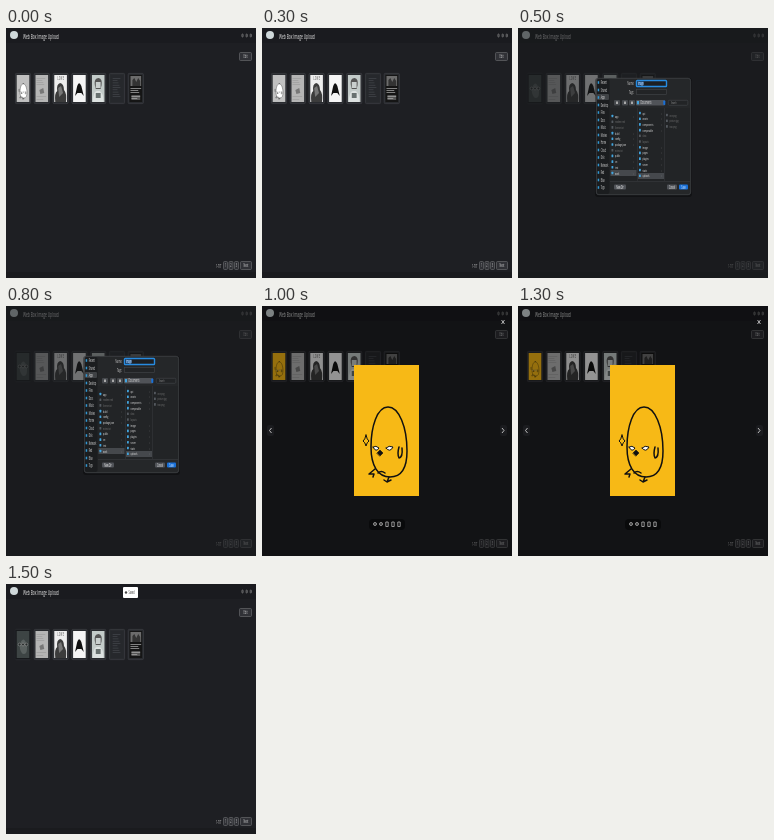
Animation, 250 px wide and 250 px high, one loop 2 s. Source, as an HTML page:

```html
<!DOCTYPE html>
<html lang="en">
<head>
<meta charset="utf-8">
<style>
  html, body { margin: 0; height: 100%; overflow: hidden; background: #1e1f23; }
  svg { display: block; width: 100vw; height: 100vh; font-family: "Open Sans", sans-serif; }
</style>
</head>
<body>
<svg id="stage" viewBox="0 0 250 250" preserveAspectRatio="none"></svg>
<script>
const SQUEEZE = 0.44; // the whole screen is narrowed, so all lettering is too
const rect = (x, y, w, h, fill, more = '') =>
  `<rect x="${x}" y="${y}" width="${w}" height="${h}" fill="${fill}" ${more}/>`;
const path = (d, fill, more = '') => `<path d="${d}" fill="${fill}" ${more}/>`;
const circle = (x, y, r, fill, more = '') => `<circle cx="${x}" cy="${y}" r="${r}" fill="${fill}" ${more}/>`;
const text = (x, y, size, label, fill = '#ddd', more = '') =>
  `<text transform="translate(${x} ${y}) scale(${SQUEEZE} 1)" font-size="${size}" fill="${fill}" ${more}>${label}</text>`;
const centred = 'text-anchor="middle"';
const group = (content, more) => `<g ${more}>${content}</g>`;
const button = (x, y, w, h, label) =>
  rect(x + .5, y + .5, w - 1, h - 1, '#303136', 'rx="1" stroke="#66676b" stroke-width=".7"') +
  text(x + w / 2, y + h / 2 + 1.8, 5, label, '#ddd', centred);

// Doodle of a chick on a 65 x 131 sheet
const chick = (paper, body, weight) => rect(0, 0, 65, 131, paper) + group(
  path('M34 42C23 42 17 62 17 82C17 101 24 112 36 112C48 112 53 102 53 86C53 62 45 42 34 42Z', body) +
  path('M19 82Q22 80 25 83Q22 88 19 82M32 83Q35 80 39 82Q36 88 32 83', '#fff', 'stroke-width="1"') +
  path('M23 88L26 85L29 88L26 91Z', '#111', 'stroke-width=".6"') +
  path('M24 108Q27 105 31 108M45 82Q43 89 45 93Q49 92 48 83M21 104L15 109L20 109L19 112M35 112L33 117L30 115M33 117L37 115', 'none') +
  path('M12 70Q13 75 15 76Q13 77 12 81Q11 77 9 76Q11 75 12 70Z', 'none', 'stroke-width="1"'),
  `stroke="#111" stroke-width="${weight}" stroke-linecap="round" stroke-linejoin="round"`);
const chickThumb = (paper, body) => group(chick(paper, body, 1.6), 'transform="scale(.2 .206)"');

const hoveredThumb = rect(-1.5, -1.5, 16, 30, '#17191c') + rect(0, 0, 13, 27, '#3d4444') +
  path('M6.8 8.6C4 9 3 15 3.4 18Q5 23 7.2 23Q10.6 23 10.6 18C10.6 13 9 9 6.8 8.6Z', '#59605f') +
  [3, 6.5, 10].map(x => circle(x, 13.5, 1.4, '#252a2a', 'stroke="#aaa" stroke-width=".5"')).join('');

const lines = (x, y, w, count, step, fill) =>
  Array.from({ length: count }, (_, i) => rect(x, y + i * step, w - (i * 3 % 4), .6, fill)).join('');

const otherThumbs = [
  rect(0, 0, 13, 27, '#b5b5b5') + lines(1, 3, 9, 4, 2, '#999') + path('M4 15L8 13L9 18L5 19Z', '#777') + lines(1, 21, 10, 2, 3, '#999'),
  rect(0, 0, 13, 27, '#eee') + text(6.5, 5, 4.5, 'L O V E', '#222', centred) +
    path('M1 27Q0 18 3 16Q2 9 6 8Q10 9 10 15Q13 18 12 27Z', '#3c3c3c') + path('M4 13L7 11L9 18L5 22Z', '#777'),
  rect(0, 0, 13, 27, '#f5f5f5') + path('M2 21L4 12Q6 5 8.5 11L11 21L8.5 18H4.5Z', '#101010'),
  rect(0, 0, 13, 27, '#c3cbc9') + path('M3 10Q2 3 7 3Q11 4 10 10L9 14H4Z', '#555') +
    rect(4, 7, 5, 6, '#c9cfce') + path('M1 27Q1 17 5 16H8Q12 18 12 27Z', '#dde2e1') + rect(4, 18, 5, 5, '#687170'),
  rect(0, 0, 13, 27, '#26282c') + lines(2, 3, 8, 9, 2.3, '#484b50'),
  rect(0, 0, 13, 27, '#151515') + path('M1 1H12V11H1Z', '#6c6c6c') + path('M3 11V5L5 3L7 7L9 3L11 6V11Z', '#333') +
    lines(1, 13, 11, 3, 2, '#ccc') + rect(2, 20, 9, 5, '#555') + lines(2, 21, 9, 2, 2.4, '#bbb'),
];

const page = first =>
  rect(0, 0, 250, 250, '#1e1f23') + rect(0, 0, 250, 15, '#1a1b1f') + rect(0, 244, 250, 6, '#1a1b1e') +
  circle(8, 7, 4, '#cfd8da') +
  text(17, 10.7, 7.5, 'Web Box Image Upload', '#eee') +
  [236.5, 240.7, 244.8].map(x => rect(x - .6, 6, 1.2, 3, 'none', 'rx=".6" stroke="#999" stroke-width=".6"')).join('') +
  button(233, 24, 13, 9, 'Edit') +
  [first, ...otherThumbs].map((art, i) => {
    const x = 9 + i * 18.8;
    return rect(x + .4, 45.4, 15.2, 30.2, '#292b2f', 'rx="1" stroke="#3e4045" stroke-width=".7"') +
      group(art, `transform="translate(${x + 1.7} 47) scale(.97 1)"`);
  }).join('') +
  text(210, 239.5, 5, '1-7/7') +
  button(217, 233, 5, 9, '1') + button(222.5, 233, 5, 9, '2') + button(228, 233, 5, 9, '3') +
  button(234, 233, 12, 9, 'Next');

const veil = (fill, opacity) => rect(0, 0, 250, 250, fill, `opacity="${opacity}"`);

const column = (x, y, names, faded) => names.split(' ').map((name, i) => {
  const dim = faded.includes(i), at = y + i * 5.7;
  return rect(x, at - 1.3, 1.8, 2.6, dim ? '#555a60' : '#42a5df', 'rx=".5"') +
    text(x + 3.5, at + 1.5, 4.2, name, dim ? '#777' : '#eee') +
    (dim ? '' : text(x + 22, at + 1.5, 4, '›', '#999'));
}).join('');

const sidebar = 'Recent Shared Apps Desktop Files Docs Music Movies Home Cloud Disk Network Red Blue Tags'.split(' ')
  .map((name, i) => rect(79.7, 53.2 + i * 7.5, 1.5, 2.6, '#3297d3') + text(82.7, 56 + i * 7.5, 4.4, name, '#e4e4e4')).join('');

const dialog =
  rect(77, 50, 97, 119, '#000', 'rx="3" opacity=".35"') +
  rect(78.3, 50.3, 94.4, 116.4, '#252729', 'rx="2.5" stroke="#4c4f52" stroke-width=".6"') +
  rect(79, 51, 12.5, 115, '#1b1d1f', 'rx="2"') + rect(79, 66, 12, 6, '#3f4245', 'rx="1"') + sidebar +
  text(116, 57, 5, 'Name:', '#ccc', 'text-anchor="end"') +
  rect(118.5, 52.5, 30, 6, '#1d1f22', 'stroke="#278be0" stroke-width="1.4" rx=".8"') +
  rect(119.6, 53.5, 6, 4, '#2562a3') + text(120, 57, 4.5, 'image', '#fff') +
  text(116, 66, 5, 'Tags:', '#ccc', 'text-anchor="end"') +
  rect(118.5, 61.5, 30, 5, '#222426', 'stroke="#44474a" stroke-width=".6"') +
  [96, 104, 111].map(x => rect(x, 72, 6, 5.5, '#45484c', 'rx="1"') + rect(x + 2, 73.5, 2, 2.5, '#aaa')).join('') +
  rect(118, 72, 29, 5.5, '#505358', 'rx="1"') + rect(119, 73, 2, 3.3, '#42a5df') +
  text(122.5, 76.4, 4.7, 'Documents', '#eee') + rect(145.3, 72.4, 2, 4.7, '#1970d8', 'rx=".8"') +
  rect(150.3, 72.3, 19.5, 5, '#222426', 'rx="1" stroke="#44474a" stroke-width=".6"') + text(153, 76, 4, 'Search', '#999') +
  rect(92, 80, 80, 73, '#222426') + rect(119.2, 80, .5, 73, '#383b3e') + rect(146.5, 80, .5, 73, '#383b3e') +
  rect(92.5, 142, 26, 6, '#45484c') + rect(120, 145, 26, 6, '#45484c') +
  column(93.5, 88, 'app readme.md license.txt build config package.json notes.txt public src test work', [1, 2, 6]) +
  column(121, 85, 'api assets components composable data layouts image pages plugins server static uploads', [4, 5]) +
  column(148, 87, 'one.png picture.jpg two.png', [0, 1, 2]) +
  rect(92, 153, 80, .5, '#3a3d40') +
  rect(96, 156.5, 12, 5, '#505358', 'rx="1"') + text(102, 160.7, 4.5, 'New Dir', '#fff', centred) +
  rect(149, 156.5, 10, 5, '#505358', 'rx="1"') + text(154, 160.7, 4.5, 'Cancel', '#fff', centred) +
  rect(161, 156.5, 9, 5, '#1970d8', 'rx="1"') + text(165.5, 160.7, 4.5, 'Save', '#fff', centred);

const viewer =
  group(chick('#f7b916', '#f7b916', 1.5), 'transform="translate(92 59)"') +
  path('M239.5 14L242.5 18M242.5 14L239.5 18', 'none', 'stroke="#ddd" stroke-width=".8"') +
  rect(5, 119, 7, 11, '#1b1c1f', 'rx="2"') + rect(238, 119, 7, 11, '#1b1c1f', 'rx="2"') +
  path('M9.5 122L7.5 124.5L9.5 127M240 122L242 124.5L240 127', 'none', 'stroke="#ccc" stroke-width=".9"') +
  rect(107, 213, 36, 11, '#090a0b', 'rx="4"') +
  [113, 119, 125, 131, 137].map((x, i) => i < 2
    ? circle(x, 218, 1.5, 'none', 'stroke="#ccc" stroke-width=".7"') + rect(x - .7, 217.7, 1.4, .6, '#ccc')
    : path(`M${x - 1.2} 216V220.5H${x + 1.2}V216Z`, 'none', 'stroke="#ccc" stroke-width=".7"')).join('');

const toast = rect(117, 3, 15, 11, '#fff', 'rx="1"') + circle(120, 8.5, 1.2, '#444') + text(122.5, 10.3, 5, 'Saved', '#333');

const scenes = [
  page(chickThumb('#c0c0c0', '#fff')),
  page(hoveredThumb) + veil('#18191b', .6) + dialog,
  group(page(chickThumb('#f7b916', '#f7b916')), 'style="filter:blur(.4px)"') + veil('#000', .4) + viewer,
  page(hoveredThumb) + toast,
];

const stage = document.getElementById('stage');
stage.innerHTML = scenes.map(scene => group(scene, 'visibility="hidden"')).join('');
const layers = [...stage.children];
const start = performance.now();

function draw() {
  const current = Math.floor((performance.now() - start) % 2000 / 500);
  layers.forEach((layer, i) => layer.setAttribute('visibility', i === current ? 'visible' : 'hidden'));
  requestAnimationFrame(draw);
}
draw();
</script>
</body>
</html>
```
